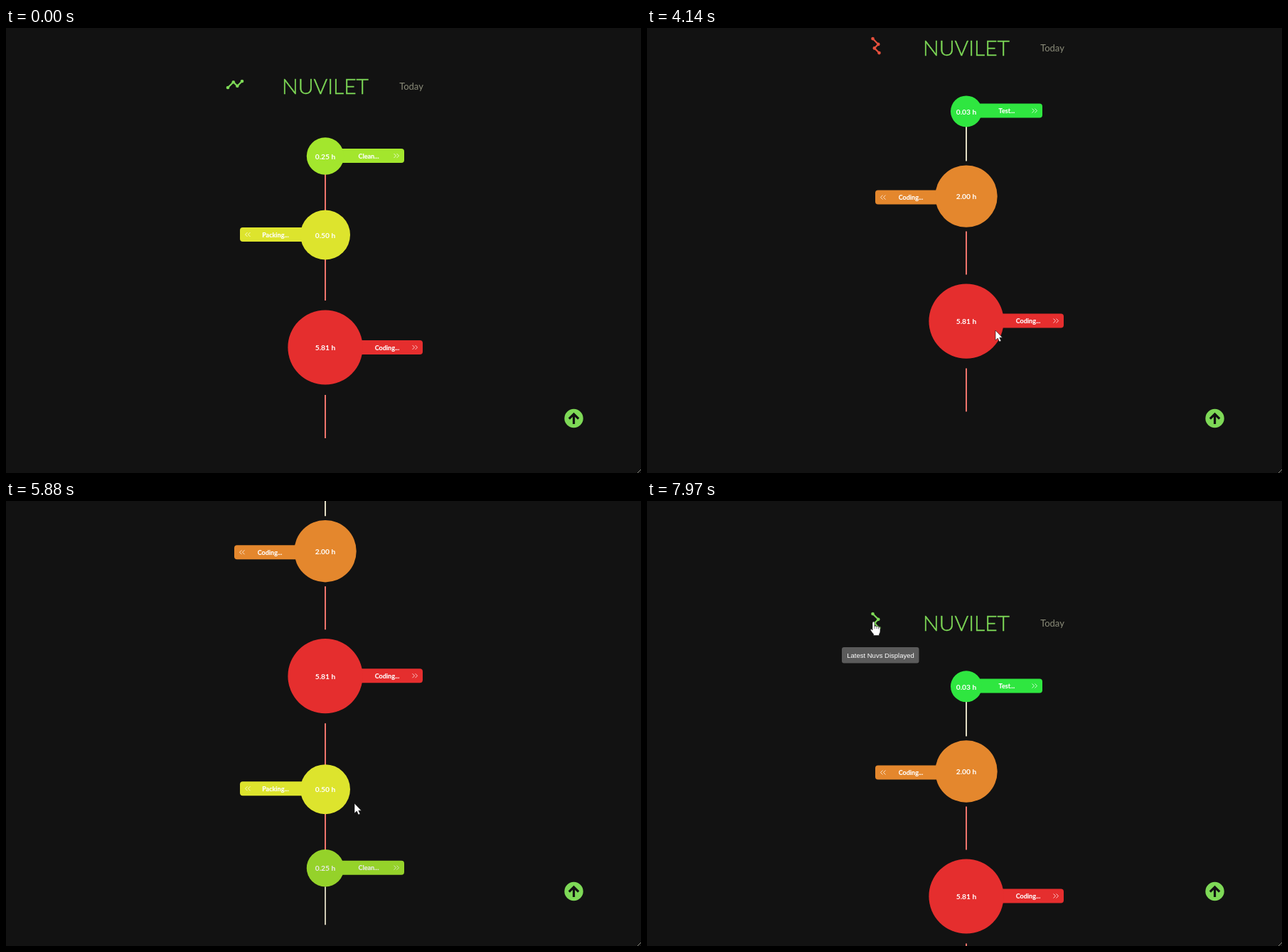
An HTML page that plays this animation: 893x627 px, repeating every 8000 ms.

```html
<!DOCTYPE html>
<html lang="en">
<head>
<meta charset="utf-8">
<title>Timeline</title>
<style>
  html, body { margin: 0; width: 100%; height: 100%; overflow: hidden; background: #121212; }
  svg { display: block; width: 893px; height: 627px; font-family: Lato, sans-serif; }
  text { text-anchor: middle; }
  .title { font-size: 30px; font-weight: 300; fill: #7ed957; stroke: #7ed957; stroke-width: .5; }
  .value { font-size: 10.3px; font-weight: 700; fill: #fff; }
  .name { font-size: 9px; font-weight: 700; fill: #fff; stroke: #fff; stroke-width: .15; }
  .chevron { fill: none; stroke: #fff; stroke-opacity: .75; }
  .tip text { font: 9.5px "Liberation Sans", Arial, sans-serif; fill: #fff; }
</style>
</head>
<body>
<svg viewBox="0 0 893 627">
  <defs>
    <g id="up">
      <circle r="13.200" fill="#7ed957"/>
      <path d="M0 8V-5.500M-6.700 .7L0-6 6.700 .7" fill="none" stroke="#121212" stroke-width="3.200"/>
    </g>
  </defs>
  <rect width="893" height="627" fill="#121212"/>
  <g id="page">
    <text class="title" x="449" y="93">NUVILET</text>
    <text x="570" y="87" font-size="13" fill="#8b8c79">Today</text>
    <g id="icon">
      <path d="M-10 4.500L-2.200-3.300 3.300 2.200 10-4.500" fill="none" stroke="currentColor" stroke-width="2.200"/>
      <g fill="currentColor">
        <circle cx="-10" cy="4.500" r="2.300"/><circle cx="-2.200" cy="-3.300" r="2.300"/>
        <circle cx="3.300" cy="2.200" r="2.300"/><circle cx="10" cy="-4.500" r="2.300"/>
      </g>
    </g>
    <g id="before"></g>
    <g id="after"></g>
    <path d="M369.500 968V991H394M377 984V975M382 984V969M387 984V976M391.500 984V969"
          fill="none" stroke="#7ed957" stroke-width="3"/>
    <text class="title" x="470" y="989">METRICS</text>
    <g id="tip" class="tip">
      <rect x="274" y="116.500" width="108.500" height="22.500" rx="3" fill="#5b5b5b"/>
      <text x="328.500" y="131.500"></text>
    </g>
  </g>
  <use id="ghost" href="#up"/>
  <use href="#up" x="798.500" y="550"/>
  <path d="M888 627L893 622" stroke="#8a8a80"/>
  <circle id="click" r="13" fill="#ff0" fill-opacity=".45"/>
  <g id="cursor" fill="#fff" stroke="#111" stroke-width=".6">
    <path id="arrow" d="M0 0V14L3.300 11 5.500 16 8 15 5.800 10.200H9.800Z"/>
    <g id="hand">
      <path d="M-2 2Q-2 0-.5 0T1 2V6.500Q2.500 5.300 4 6.700 5.500 6 6.500 7.500 9 7 9 9.500V13.500Q9 15.500 7.500 17.500V19.500H-.5V17.500Q-2.500 15.500-4.500 12.200-5 10-3.200 10.200L-2 12Z"/>
      <path d="M1 6.500V10M4 7V10M6.500 8V10.500" fill="none"/>
    </g>
  </g>
</svg>
<script>
const LOOP = 8000, AXIS = 449, PINK = '#ee746c', PALE = '#e2ddc4';
const $ = id => document.getElementById(id);
const clamp = v => Math.max(0, Math.min(1, v));
const ramp = (t, a, b) => clamp((t - a) / (b - a));
const smooth = p => p * p * (3 - 2 * p);
const show = (el, on) => el.setAttribute('opacity', +on);
const move = (el, x, y, extra = '') => el.setAttribute('transform', `translate(${x} ${y})${extra}`);

// Piecewise interpolation over rows of [time, ...values].
function track(rows, t, ease = p => p) {
  let i = 0;
  while (i < rows.length - 2 && t >= rows[i + 1][0]) i++;
  const [a, b] = [rows[i], rows[i + 1]];
  const p = ease(ramp(t, a[0], b[0]));
  return a.slice(1).map((v, k) => v + (b[k + 1] - v) * p);
}

// One bubble with its label, side is 1 for right and -1 for left.
function item(y, r, hours, name, color, side, line, lineColor, labelY) {
  const width = Math.round(r + 84.5);
  const edge = AXIS + side * width;
  const x = side > 0 ? AXIS : edge;
  const cx = edge - side * 11;
  const chevron = [-3.5, .5].map(d =>
    `M${cx + side * d} ${labelY - 3}l${side * 3} 3l${-side * 3} 3`).join('');
  return `<g>
    <path d="M${AXIS} ${line[0]}V${line[1]}" stroke="${lineColor}" stroke-width="2"/>
    <rect x="${x}" y="${labelY - 10}" width="${width}" height="20" rx="4" fill="${color}"/>
    <circle cx="${AXIS}" cy="${y}" r="${r}" fill="${color}"/>
    <text class="value" x="${AXIS}" y="${y + 4.3}">${hours} h</text>
    <text class="name" x="${edge - side * 50}" y="${labelY + 3.8}">${name}...</text>
    <path class="chevron" d="${chevron}"/></g>`;
}

const LIME = '#a3e62d', YELLOW = '#dde42d', RED = '#e52e2e', ORANGE = '#e4872d', GREEN = '#2fe640';
$('before').innerHTML =
  item(180.5, 26.2, '0.25', 'Clean', LIME, 1, [206, 257], PINK, 180) +
  item(291.5, 35, '0.50', 'Packing', YELLOW, -1, [326, 384], PINK, 291) +
  item(450, 52.6, '5.81', 'Coding', RED, 1, [517, 578], PINK, 450);
$('after').innerHTML =
  item(171.8, 22, '0.03', 'Test', GREEN, 1, [193, 242], PALE, 171) +
  item(291.5, 43.7, '2.00', 'Coding', ORANGE, -1, [341, 402], PINK, 293) +
  item(467.5, 52.6, '5.81', 'Coding', RED, 1, [534, 595], PINK, 467) +
  item(627, 35, '0.50', 'Packing', YELLOW, -1, [661, 713], PINK, 626) +
  item(738, 26.2, '0.25', 'Clean', LIME, 1, [764, 818], PALE, 737.5);

const later = [...$('after').children];
const names = $('after').querySelectorAll('.name');
const firstLine = $('after').querySelector('path');
const tipText = $('tip').querySelector('text');

const scroll = [[0, 0], [4030, 0], [4140, -54], [4250, -100], [4390, -100], [4650, -200],
  [4900, -300], [5190, -400], [5225, -400], [5260, -357], [5450, -300], [5700, -250],
  [6010, -200], [6050, -200], [6150, -106], [6300, -10], [6470, 79], [6540, 89.5], [LOOP, 89.5]];
const pointer = [[120, 847, 601], [900, 405, 108], [1550, 327, 83], [1790, 327, 83],
  [1820, 324, 83], [2700, 324, 83], [3270, 453, 142], [3840, 490, 426], [6530, 490, 426],
  [6870, 321, 172], [7270, 319, 170], [LOOP, 319, 170]];

function draw(t) {
  const [offset] = track(scroll, t);
  move($('page'), 0, offset);

  const oldest = t >= 2490 && t < 7940;
  const turn = 90 * (1 - (1 - ramp(t, 2490, 3100)) ** 2);
  move($('icon'), 322, 79.5, `rotate(${turn})`);
  $('icon').style.color = oldest ? '#e5503d' : '#7ed957';

  const swapped = t >= 2580, renamed = t >= 2700;
  show($('before'), !swapped);
  show($('after'), swapped);
  names[0].textContent = renamed ? 'Test...' : 'Clean...';
  names[1].textContent = renamed ? 'Coding...' : 'Packing...';
  firstLine.setAttribute('stroke', renamed ? PALE : PINK);
  show(later[3], ramp(t, 4190, 4550));
  show(later[4], .91 * ramp(t, 4600, 5100));

  tipText.textContent = (oldest ? 'Oldest' : 'Latest') + ' Nuvs Displayed';
  show($('tip'), ramp(t, 1230, 1430) * (1 - ramp(t, 2800, 2950)) + ramp(t, 6930, 7150));

  const slide = track([[4700, 80], [5260, 54], [5700, 24]], t)[0];
  move($('ghost'), 798.5 + slide, 550 + slide);
  show($('ghost'), .42 * ramp(t, 4700, 5100) * (1 - ramp(t, 5270, 5650)));

  const [x, y] = track(pointer, t, smooth);
  const hand = (t > 1250 && t < 2800) || (t > 6230 && t < 6540) || t > 6800;
  move($('cursor'), x, y);
  show($('cursor'), t >= 120);
  show($('arrow'), !hand);
  show($('hand'), hand);
  move($('click'), x, y);
  show($('click'), (t >= 2330 && t < 2490) || (t >= 7760 && t < 7940));
}

const start = performance.now();
function tick() {
  draw((performance.now() - start) % LOOP);
  requestAnimationFrame(tick);
}
tick();
</script>
</body>
</html>
```
